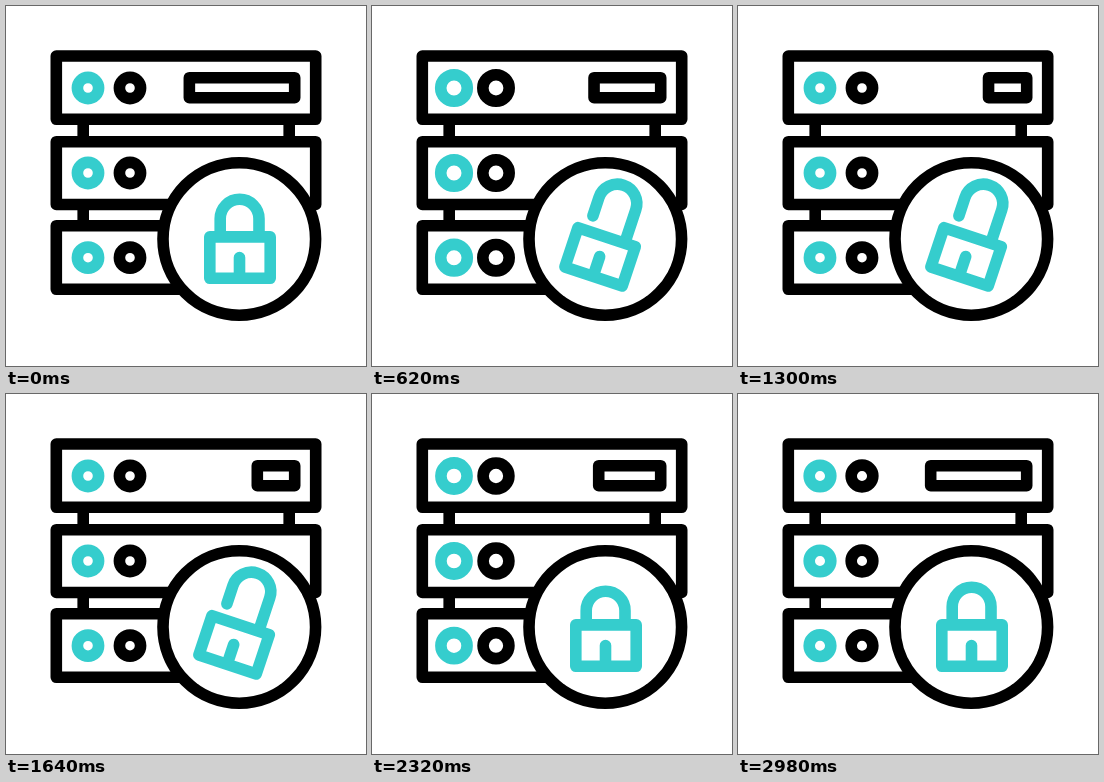
An HTML page for the animation above (3 s loop, 360 by 360 pixels).

```html
<!DOCTYPE html>
<html lang="en">
<head>
<meta charset="utf-8">
<title>Server lock</title>
<style>
  html, body { margin: 0; width: 100%; height: 100%; overflow: hidden; background: #fff; }
  svg { display: block; width: 100vw; height: 100vh; }
  g, circle { stroke-width: 11.6; stroke-linecap: round; stroke-linejoin: round; }
  .ink { fill: none; stroke: #000; }
  .teal { fill: none; stroke: #35cdcd; }
</style>
</head>
<body>
<svg viewBox="0 0 360 360">
  <g class="ink">
    <path d="M77.2 113V136M283.2 113V136M77.2 198V220" stroke-linecap="butt"/>
    <path d="M50.3 50H309.7V113.3H50.3ZM50.3 135.7H309.7V198.5H50.3ZM233 219.7H50.3V283.3H200"/>
    <path id="bar"/>
  </g>
  <g id="leds"></g>
  <circle class="ink" cx="233.3" cy="233" r="76.3" style="fill:#fff"/>
  <g id="lock" class="teal">
    <path id="shackle"/>
    <path d="M203.8 230.9H264.2V272.3H203.8ZM233.5 251.5V270"/>
  </g>
</svg>
<script>
const LOOP = 3000;
const $ = id => document.getElementById(id);
const clamp = x => Math.min(1, Math.max(0, x));
const span = (t, a, b) => clamp((t - a) / (b - a));
const smooth = x => x * x * (3 - 2 * x);
const ramp = (t, a, b) => smooth(span(t, a, b));
const pulse = (t, a, b) => Math.sin(Math.PI * span(t, a, b));

// cubic-bezier(.167, .167, .667, 1): linear start, soft landing
function settle(x) {
  const curve = (s, p, q) => 3 * (1 - s) ** 2 * s * p + 3 * (1 - s) * s * s * q + s ** 3;
  let lo = 0, hi = 1;
  for (let i = 0; i < 24; i++) {
    const mid = (lo + hi) / 2;
    if (curve(mid, .167, .667) < x) lo = mid; else hi = mid;
  }
  return curve(lo, .167, 1);
}

const leds = [];
for (const y of [82, 167, 251.7]) {
  for (const [x, kind] of [[82, 'teal'], [124, 'ink']]) {
    const led = document.createElementNS('http://www.w3.org/2000/svg', 'circle');
    led.setAttribute('class', kind);
    led.setAttribute('cx', x);
    led.setAttribute('cy', y);
    $('leds').append(led);
    leds.push({ led, late: kind === 'ink' });
  }
}

function draw(t) {
  const shrink = settle(span(t, 0, 1400)) - settle(span(t, 1900, 3400));
  const left = 183.3 + 68 * shrink;
  $('bar').setAttribute('d', `M${left} 71.7H288.7V91.7H${left}Z`);

  for (const { led, late } of leds) {
    const swell = late
      ? pulse(t, 160, 1290) + pulse(t, 1980, 3010)
      : pulse(t, 0, 1200) + pulse(t, 1910, 3010);
    led.setAttribute('r', 10.6 + 2.7 * swell);
  }

  const open = ramp(t, 40, 480) - ramp(t, 1740, 2300);
  $('lock').setAttribute('transform', `rotate(${18.4 * open} 233.5 233)`);

  // The shackle dips a little before opening and after closing.
  const dip = 4 * (ramp(t, 0, 120) - ramp(t, 2300, 2560));
  const lift = 21 * open - dip;
  const top = 212.7 - lift;
  const tip = 230 - 15 * clamp(lift / 9);
  $('shackle').setAttribute('d', `M214.2 ${tip}V${top}A19.4 19.4 0 0 1 253 ${top}V230`);
}

const start = performance.now();
function tick() {
  draw((performance.now() - start) % LOOP);
  requestAnimationFrame(tick);
}
tick();
</script>
</body>
</html>
```
